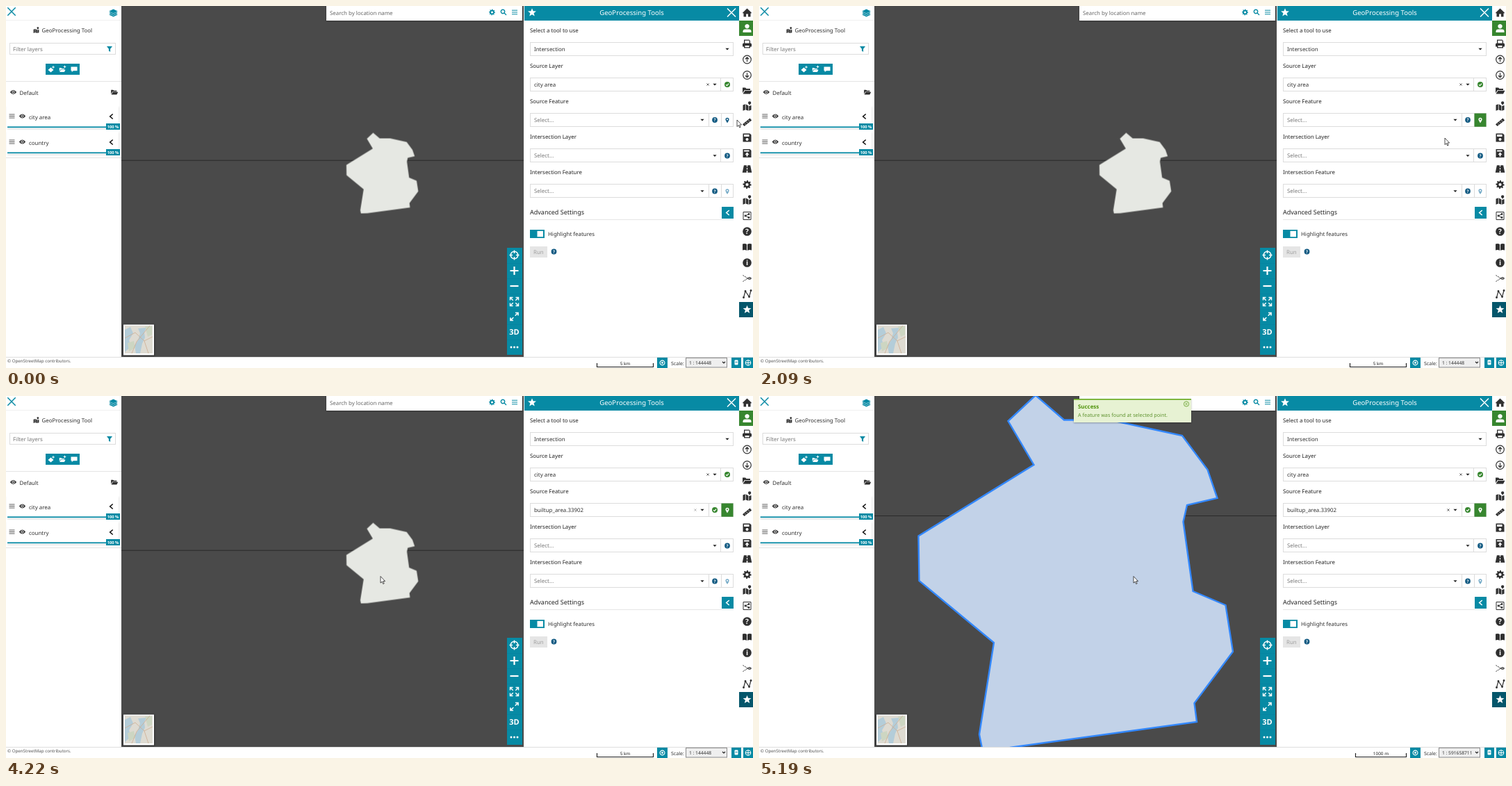
Animation, 1075 px wide and 521 px high, one loop 6250 ms. Source, as an HTML page:

```html
<!DOCTYPE html>
<html lang="en">
<head>
<meta charset="utf-8">
<title>Geoprocessing tool</title>
<style>
html, body { margin: 0; width: 100%; height: 100%; overflow: hidden; background: #fff; }
svg { display: block; width: 100%; height: 100%; }
text { font-family: "Noto Sans", sans-serif; white-space: pre; text-rendering: geometricPrecision; }
</style>
</head>
<body>
<svg id="stage" viewBox="0 0 1075 521"></svg>
<script>
const TEAL = '#078aa4', GREEN = '#37862f', NAVY = '#125a82', INK = '#303030', MAP = '#4a4a4a';
const LOOP = 6250;

// Drawing helpers, all returning SVG markup
const rect = (x, y, w, h, fill, more = '') =>
  `<rect x="${x}" y="${y}" width="${w}" height="${h}" fill="${fill}" ${more}/>`;
const box = (x, y, w, h) => rect(x + .5, y + .5, w - 1, h - 1, '#fff', 'stroke="#dcdcdc"');
const text = (x, y, s, size = 7.9, fill = INK, more = '') =>
  `<text x="${x}" y="${y}" font-size="${size}" fill="${fill}" ${more}>${s}</text>`;
const line = (d, color, width = 1, more = '') =>
  `<path d="${d}" fill="none" stroke="${color}" stroke-width="${width}" ${more}/>`;
const group = (id, content, more = '') => `<g id="${id}" ${more}>${content}</g>`;
const at = (x, y, content, scale = 1, turn = 0) =>
  `<g transform="translate(${x} ${y}) rotate(${turn}) scale(${scale})">${content}</g>`;
const icon = (name, x, y, color = INK, scale = 1) =>
  at(x, y, `<path d="${shapes[name]}" fill="${color}" fill-rule="evenodd"/>`, scale);
const stroked = (d, x, y, color, width = 1.2, turn = 0) => at(x, y, line(d, color, width), 1, turn);

const ring = r => `M${-r} 0a${r} ${r} 0 1 1 ${2 * r} 0a${r} ${r} 0 1 1 ${-2 * r} 0Z`;
const radial = (n, radius) => 'M' + Array.from({ length: n }, (_, i) => {
  const a = 2 * Math.PI * i / n - Math.PI / 2, r = radius(i);
  return (r * Math.cos(a)).toFixed(2) + ' ' + (r * Math.sin(a)).toFixed(2);
}).join('L') + 'Z';

const shapes = {
  home: 'M-6.5 .2L0-6L6.5 .2L5.6 1.2L5 .7V6H1.4V2H-1.4V6H-5V.7L-5.6 1.2Z',
  user: 'M0-6a3.2 3.2 0 1 1-.01 0ZM-6 6V4.6q0-3.1 3.4-3.1h5.2q3.4 0 3.4 3.1V6Z',
  print: 'M-4.5-6H3L4.5-4.5V-1H3.2V-4.8H-3.2V-1H-4.5ZM-5-1H5q1.5 0 1.5 1.5V4H4.5V6H-4.5V4H-6.5V.5q0-1.5 1.5-1.5ZM-3 2.5V4.8H3V2.5Z',
  folder: 'M-6.5 3.3V-4.5H-2.5L-1-3H4.5V-1H-3.7ZM-3-.2H7L4.5 4.5H-6Z',
  map: 'M-6-2L-2.7-3.2V5L-6 6.2ZM-1.9-3.2L1.9-1V6.2L-1.9 5ZM2.7-.6L6-1.6V5L2.7 6.2ZM3.6-2Q1.4-4 1.4-5a2.2 2.2 0 0 1 4.4 0Q5.8-4 3.6-2Z',
  ruler: 'M-6.5 3.2L4-5.5L6.6-2.6L-4 6ZM-3.6 2.3L-2.4 3.8L-1.9 3.4L-3.1 1.9ZM-1-.1L.2 1.4L.7 1L-.5-.5ZM1.7-2.3L2.9-.8L3.4-1.2L2.2-2.7Z',
  save: 'M-6-6H4L6-4V6H-6ZM-4.4-4.6V-1.4H3V-4.6ZM0 .6a2 2 0 1 0 .01 0Z',
  upload: 'M-6-6H4L6-4V6H-6ZM-4.4-4.6V-2.4H3V-4.6ZM0-1.4L-3 2H-1V4.5H1V2H3Z',
  road: 'M-4.6-5.2H-.6V-3H.6V-5.2H4.6L6.8 5.2H.8V2.4H-.8V5.2H-6.8ZM-.6-1.5V.9H.6V-1.5Z',
  book: 'M-6.5-4.6q4-.8 6 .5V5q-2-1.4-6-.6ZM.5-4.1q2-1.3 6-.5V4.4q-4-.8-6 .6Z',
  gear: radial(32, i => i % 4 < 2 ? 6.2 : 4.6) + ring(2.1),
  star: radial(10, i => i % 2 ? 2.7 : 6.3),
  eye: 'M-4.7 0Q0-6 4.7 0Q0 6-4.7 0ZM0-2a2 2 0 1 0 .01 0ZM0-1.2a1.2 1.2 0 1 0 .01 0Z',
  layers: 'M0-5.5L6.3-2.4L0 .7L-6.3-2.4ZM-6.3 0L-4.3-.9L0 1.3L4.3-.9L6.3 0L0 3.2ZM-6.3 2.4L-4.3 1.5L0 3.7L4.3 1.5L6.3 2.4L0 5.6Z',
  sheet: 'M0-3.6L4 0L0 3.6L-4 0Z',
  funnel: 'M-4-4H4L1.1-.2V4L-1.1 2.6V-.2Z',
  pin: 'M0 4Q-2.6 .6-2.6-1.2a2.6 2.6 0 0 1 5.2 0Q2.6 .6 0 4ZM0-2.2a1 1 0 1 0 .01 0Z',
  caret: 'M-2.6-1.3H2.6L0 1.5Z',
  bubble: 'M-4.5-3.5H4.5V2.2H-1L-3.3 4V2.2H-4.5Z'
};

const chevron = (x, y, color) => stroked('M2.2-3.5L-1.8 0L2.2 3.5', x, y, color, 1.6);
const cross = (x, y, r, color, w) => stroked(`M${-r} ${-r}L${r} ${r}M${-r} ${r}L${r} ${-r}`, x, y, color, w);
const plus = (x, y, r, color, w) => stroked(`M${-r} 0H${r}M0 ${-r}V${r}`, x, y, color, w);
const bars = (x, y, w, color, gap = 2.5) =>
  stroked([-gap, 0, gap].map(d => `M${-w} ${d}H${w}`).join(''), x, y, color, 1);
const badge = (x, y, s, r, color) => at(x, y, `<path d="${ring(r)}" fill="${color}"/>` +
  text(0, r * .55, s, r * 1.6, '#fff', 'text-anchor="middle" font-weight="700"'));
const help = (x, y) => badge(x, y, '?', 3.9, NAVY);
const check = (x, y) => at(x, y, `<path d="${ring(4)}" fill="${GREEN}"/>` + line('M-2 .1L-.5 1.6L2.1-1.3', '#fff', 1.2));

const outline = 'M398-1L439 34.5L505 34.5L609 57L645.5 106L659.5 147L616 157L610.5 181L624.5 281L671.5 301L682 368' +
  'L626.5 442L630 469L361 506L321 507L317 487L338 355L230.5 266L229.5 201.5L395.5 99L358.5 36Z';

function mapView() {
  const tiles = rect(171, 460, 40, 40, '#dedbd2') +
    `<path d="M171 466l8-4 4 9-6 10 3 9-9 8ZM190 464l3 7-3 10-5 8 2 11h6l3-14 4-9-1-7 3-7Z" fill="#b4cdd9"/>` +
    `<path d="M200 461h10v12l-6 3ZM175 485l9-3 2 10-9 5Z" fill="#cdd6c2"/>` +
    line('M171 478L186 470L199 482L211 476M181 500L188 483L207 460M199 482L205 500', '#cfae92', .8);
  const controls = rect(721, 348, 22, 154, TEAL) +
    line([370, 392, 414, 436, 458, 480].map(y => `M721 ${y}.5H743`).join(''), '#0680a0', .6) +
    stroked(ring(5.3) + 'M0-7V-2.5M0 7V2.5M-7 0H-2.5M7 0H2.5', 731.5, 358.5, '#fff', 1.5) +
    plus(731.5, 381, 6, '#fff', 2.2) + stroked('M-6 0H6', 731.5, 403, '#fff', 2.2) +
    stroked('M-6-2V-6H-2M2-6H6V-2M6 2V6H2M-2 6H-6V2M-5-5L-1.8-1.8M5-5L1.8-1.8M5 5L1.8 1.8M-5 5L-1.8 1.8', 731.5, 425.5, '#fff', 1.4) +
    stroked('M1.5-5.5H5.5V-1.5M-1.5 5.5H-5.5V1.5M5.5-5.5L1.2-1.2M-5.5 5.5L-1.2 1.2', 731.5, 447, '#fff', 1.6) +
    text(731.5, 473, '3D', 11, '#fff', 'text-anchor="middle" font-weight="700"') +
    [-4.5, 0, 4.5].map(d => `<circle cx="${731.5 + d}" cy="491" r="1.5" fill="#fff"/>`).join('');
  const dots = Array.from({ length: 12 }, (_, i) =>
    `<circle cx="7.4" r="1.3" fill="#fff" opacity="${.12 + i / 13}" transform="rotate(${i * 30})"/>`).join('');
  return rect(166, 0, 580, 505, MAP) +
    '<clipPath id="frame"><rect x="166" width="580" height="505"/></clipPath><g clip-path="url(#frame)">' +
    group('lineSharp', rect(166, 0, 580, 1, '#292929')) +
    group('blurred', rect(166, 169.8, 580, 4.4, '#303030', 'filter="url(#soft)"') +
      line(outline, '#e6e8e3', 4.6, 'opacity=".6" filter="url(#soft)"')) +
    `<path id="area" d="${outline}"/></g>` +
    rect(168, 458, 46, 46, '#000', 'opacity=".35" filter="url(#soft)"') + rect(169, 458.5, 44, 44, '#fff') + tiles +
    rect(461, 1, 283, 21, '#000', 'opacity=".3" filter="url(#soft)"') + rect(461, 0, 282, 21, '#fff') +
    text(466, 13, 'Search by location name', 7.9, '#666') +
    icon('gear', 699.5, 9, TEAL, .72) + stroked(ring(2.7) + 'M2 2L5 5', 715, 8, TEAL, 1.4) + bars(732, 9, 4, TEAL, 2.8) +
    controls + group('busyMap', rect(721, 326, 22, 22, TEAL) +
      `<g transform="translate(731.5 337)"><g class="spin">${dots}</g></g>`);
}

function layerRow(y, name) {
  return rect(2, y - 14, 160, 32, '#000', 'opacity=".22" filter="url(#soft)"') + rect(1, y - 16, 161, 33.5, '#fff') +
    bars(8.5, y - .5, 4, '#555') + icon('eye', 23.5, y - .5) + text(33, y + 3.5, name) +
    `<g class="idle">${chevron(151.5, y, '#111')}</g>` +
    `<g class="busy" transform="translate(151.5 ${y})">${line(ring(3.8), '#e3e7e9')}` +
    `<g class="spin">${line('M0-3.8A3.8 3.8 0 0 1 3.8 0', '#8fb5c0')}</g></g>` +
    rect(2, y + 14.4, 144, 1.8, TEAL) + rect(144, y + 10, 20, 9, TEAL) +
    text(154, y + 16.6, '100 %', 5.8, '#fff', 'text-anchor="middle" font-weight="600"');
}

function leftPanel() {
  return rect(0, 0, 166, 505, '#fff') + cross(8, 8, 5.7, TEAL, 1.5) + icon('layers', 154.5, 10, TEAL) +
    rect(0, 20, 166, 1, '#f0f0f0') + icon('map', 43.5, 35, INK, .65) + text(51.5, 38.2, 'GeoProcessing Tool') +
    box(5, 53, 153, 17) + text(10, 65, 'Filter layers', 7.9, '#757575') + icon('funnel', 149, 62, TEAL) +
    rect(57, 83, 49, 16, TEAL) + icon('sheet', 64.5, 92, '#fff') + plus(68, 88, 1.8, '#fff', 1) +
    icon('folder', 81, 92, '#fff', .65) + plus(84.5, 87.5, 1.8, '#fff', 1) + icon('bubble', 98, 91, '#fff') +
    rect(0, 108, 166, 1, '#e4e4e4') + icon('eye', 10.5, 124) + text(19.5, 128, 'Default') + icon('folder', 156, 124, INK, .75) +
    layerRow(159, 'city area') + layerRow(196, 'country') + rect(0, 218, 166, 1, '#e2e2e2');
}

function toolPanel() {
  const label = (y, s) => text(754, y, s, 7.9, '#222');
  const hint = y => text(760, y, 'Select...', 7.9, '#777');
  const field = (y, right) => box(754, y, right - 754, 20) + (right < 1047 ? box(right - 1, y, 1048 - right, 20) : '');
  const caret = (x, y) => icon('caret', x, y, '#222');
  return rect(745, 0, 310, 505, '#fff') + rect(746, 0, 309, 21, TEAL) + icon('star', 757, 9.5, '#fff') +
    text(900.5, 13, 'GeoProcessing Tools', 9.55, '#fff', 'text-anchor="middle"') + cross(1044, 9.5, 6, '#fff', 1.5) +
    label(38, 'Select a tool to use') + field(52, 1047) + text(760, 65, 'Intersection') + caret(1038, 62) +
    label(89, 'Source Layer') + field(103, 1029) + text(760, 116, 'city area') + cross(1010, 113, 1.6, '#555', .9) +
    caret(1020, 113) + check(1038, 113) +
    label(140, 'Source Feature') + field(154, 1012) + line('M1029.5 154V174', '#dcdcdc') +
    group('empty', hint(167) + help(1020, 164)) +
    group('chosen', text(760, 167, 'builtup_area.33902') + check(1020, 164) +
      group('clear', cross(992, 164, 1.6, '#555', .9))) + caret(1002, 164) +
    rect(1029.5, 154.5, 17, 19.3, GREEN, 'id="pick"') + group('pin', icon('pin', 1038, 164.5, 'currentColor')) +
    label(191, 'Intersection Layer') + field(205, 1029) + hint(218) + caret(1020, 215.5) + help(1038, 215.5) +
    label(242, 'Intersection Feature') + field(256, 1012) + line('M1029.5 256V276', '#dcdcdc') +
    hint(269) + caret(1002, 266.5) + help(1020, 266.5) + icon('pin', 1038, 267, '#79adc9') +
    text(754, 300, 'Advanced Settings', 9, '#222') + rect(1030, 289, 17, 17, TEAL) + chevron(1038.5, 297.5, '#fff') +
    rect(754, 307, 293, 1, '#e6e6e6') + rect(754, 322, 21, 12, TEAL) + rect(764.5, 323.8, 8.5, 8.4, '#fff') +
    text(780, 331.3, 'Highlight features') + rect(754, 346, 25, 16, '#e5e5e5') + text(759, 357, 'Run', 7.9, '#a0a0a0') +
    help(788.5, 353.5);
}

function sideBar() {
  const x = 1066.5, row = i => 9.5 + i * 22.5;
  const arrow = ring(5.8) + 'M0 3.2V-3M-2.6-.5L0-3.1L2.6-.5';
  const list = { 0: 'home', 2: 'print', 5: 'folder', 6: 'map', 7: 'ruler', 8: 'save', 9: 'upload', 10: 'road', 11: 'gear', 12: 'map', 15: 'book' };
  const dot = (dx, y, r = 1.4) => `<circle cx="${x + dx}" cy="${y}" r="${r}" fill="${INK}"/>`;
  return rect(1055, 0, 20, 505, '#fff') + rect(1055, 21, 20, 22, GREEN) + icon('user', x, 32, '#fff') +
    Object.entries(list).map(([i, name]) => icon(name, x, row(+i))).join('') +
    stroked(arrow, x, row(3), INK) + stroked(arrow, x, row(4), INK, 1.2, 180) +
    stroked('M-5.5-5.5H5.5V5.5H-5.5Z M2.5-2.5L-2.5 0L2.5 2.5', x, row(13), INK, 1) +
    dot(2.5, row(13) - 2.5) + dot(-2.5, row(13)) + dot(2.5, row(13) + 2.5) +
    badge(x, row(14), '?', 6.3, INK) + badge(x, row(16), 'i', 6.3, INK) +
    at(x, row(17), line('M-6-4.5L1 0L-6 4.5', INK, 1, 'stroke-dasharray="2 1"')) + icon('eye', x + 3.5, row(17), INK, .65) +
    stroked('M-5 5L-2.5-4L3 4L5.5-5', x, row(18), INK) +
    dot(-5, row(18) + 5) + dot(-2.5, row(18) - 4) + dot(3, row(18) + 4) + dot(5.5, row(18) - 5) +
    rect(1055, 426, 20, 22, '#04566b') + icon('star', x, 437, '#fff');
}

function footer() {
  return rect(0, 505, 1075, 16, '#fff') + rect(0, 505, 1075, 1, '#dedede') +
    text(2, 513, '© OpenStreetMap contributors.', 6.17, '#555') +
    line('', '#222', 1.2, 'id="ruler"') + text(0, 517, '', 6.4, '#222', 'id="distance" text-anchor="middle"') +
    rect(937, 506, 15, 15, TEAL) + stroked(ring(3.4), 944.5, 513.5, '#fff', 1.1) + `<circle cx="944.5" cy="513.5" r="1.4" fill="#fff"/>` +
    text(957, 516.5, 'Scale:', 7) + rect(978.5, 506.5, 59, 13.5, '#efefef', 'stroke="#8a8a8a"') +
    text(983, 516, '', 6.7, '#333', 'id="ratio"') + stroked('M-2-1L0 1L2-1', 1033, 513, '#222') +
    rect(1044, 506, 14, 15, TEAL) + rect(1048.5, 509.5, 5, 7, '#fff', 'rx="1"') + rect(1049.5, 512, 3, 1, TEAL) +
    rect(1061, 506, 14, 15, TEAL) + stroked(ring(3.8) + 'M-3.8 0H3.8M0-3.8V3.8', 1068, 513.5, '#fff', 1);
}

const overlays = () =>
  group('notice', rect(453, 5, 169, 34, '#000', 'opacity=".3" filter="url(#soft)"') + rect(453, 4, 169, 34, '#e7f2d3') +
    rect(453, 4, 169, 1.6, '#66a81c') + text(459, 17.8, 'Success', 7.9, '#4f930a', 'font-weight="700"') +
    text(459, 29.8, 'A feature was found at selected point.', 7.27, '#5f9330') +
    stroked(ring(3.6), 615, 11.5, '#79ad43', 1) + cross(615, 11.5, 1.4, '#79ad43', 1)) +
  group('tip', rect(948, 157, 77, 14, '#383838', 'rx="1"') + `<path d="M1025 161.5L1028 164L1025 166.5Z" fill="#383838"/>` +
    text(952.5, 166.8, 'Click to select feature', 7.5, '#fff')) +
  group('arrow', '<path d="M0 0V9.6L2.2 7.6L3.7 11L5.2 10.3L3.7 7H6.6Z" fill="#fff" stroke="#222" stroke-width=".8"/>') +
  group('hand', '<path d="M-1 1q1-1.4 2 0V5q3.7 .2 4.4 1.5V9.5L4.5 12.3H-1L-3.7 8q.6-1.5 2.7 .3Z" fill="#fff" stroke="#222" stroke-width=".8"/>');

document.getElementById('stage').innerHTML =
  '<filter id="soft" x="-20%" y="-80%" width="140%" height="260%"><feGaussianBlur stdDeviation="1.3"/></filter>' +
  mapView() + leftPanel() + toolPanel() + sideBar() + footer() + overlays();

// Pointer steps: evenly spaced in time, each held until the next
const spread = (from, to, points) => points.map((p, i) => [from + (to - from) * i / (points.length - 1), ...p]);
const track = [
  [0, 1052, 164],
  ...spread(330, 680, [[1051, 164], [1049, 164], [1047, 164], [1045, 164], [1044, 164], [1044, 165]]),
  ...spread(1960, 2550, [[1041, 168], [1022, 176], [987, 190], [938, 206], [881, 222], [826, 234], [776, 241], [740, 244], [718, 246], [708, 246]]),
  ...spread(2620, 3160, [[703, 242], [676, 241], [630, 251], [572, 267], [524, 277], [502, 274], [512, 263], [527, 255], [533, 253]]),
  [3560, 536, 256], [3630, 539, 259.5]
];

const $ = id => document.getElementById(id);
const show = (el, on) => { el.style.opacity = +on; };
const ramp = (t, from, to) => Math.min(1, Math.max(0, (t - from) / (to - from)));
const all = name => [...document.querySelectorAll('.' + name)];
const [spinners, busy, idle] = ['spin', 'busy', 'idle'].map(all);

function render(t) {
  const [, x, y] = track.filter(p => p[0] <= t + .5).pop();
  const pointing = t >= 470 && t < 2025;
  for (const id of ['arrow', 'hand']) $(id).setAttribute('transform', `translate(${x} ${y})`);
  show($('hand'), pointing);
  show($('arrow'), !pointing);
  show($('tip'), t < 1960 ? ramp(t, 470, 680) : 1 - ramp(t, 1960, 2090));
  show($('pick'), ramp(t, 880, 1070));
  $('pin').style.color = t >= 2025 ? '#fff' : pointing ? TEAL : NAVY;

  const chosen = t >= 4220, zoomed = t >= 4290, sharp = t >= 5120;
  show($('empty'), !chosen);
  show($('chosen'), chosen);
  show($('clear'), zoomed ? 1 : .45);
  show($('blurred'), zoomed && !sharp);
  show($('lineSharp'), !zoomed || sharp);
  $('lineSharp').setAttribute('transform', `translate(0 ${zoomed ? 172 : 221.7})`);
  const area = $('area');
  area.setAttribute('transform', zoomed ? '' : 'matrix(.2285 0 0 .2285 437.4 182.7)');
  area.setAttribute('fill', zoomed ? '#c2d2e8' : '#e6e8e3');
  area.setAttribute('stroke', zoomed ? '#3388ff' : 'none');
  area.setAttribute('stroke-width', 2.4);

  const left = t < 4360 ? 850.5 : 858.5;
  $('ruler').setAttribute('d', `M${left} 514V519.5H931.5V514`);
  $('distance').setAttribute('x', (left + 931.5) / 2);
  $('distance').textContent = zoomed ? '1000 m' : '5 km';
  $('ratio').textContent = zoomed ? '1 : 591658711' : '1 : 144448';

  const loading = t >= 4360 && t < 5190;
  show($('busyMap'), loading);
  busy.forEach(el => show(el, loading));
  idle.forEach(el => show(el, !loading));
  const turn = 180 + Math.floor((t - 4360) / 70) * 30;
  spinners.forEach(el => el.setAttribute('transform', `rotate(${turn})`));
  show($('notice'), ramp(t, 4360, 4700));
}

const start = performance.now();
function tick() {
  render((performance.now() - start) % LOOP);
  requestAnimationFrame(tick);
}
tick();
</script>
</body>
</html>
```
